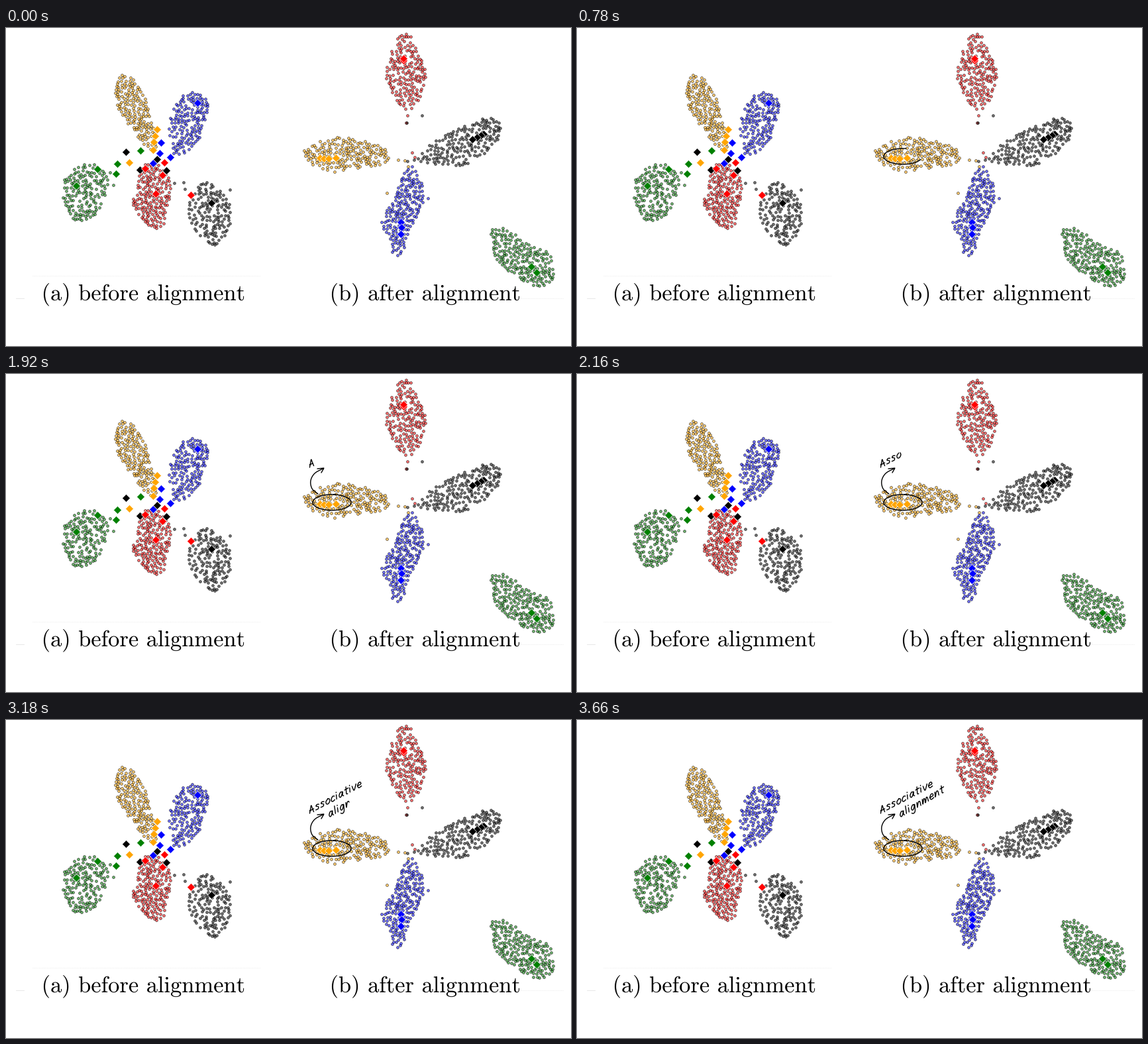
A matplotlib script for the animation above (8 s loop, 853x480 px).

```python
import numpy as np
import matplotlib.pyplot as plt
from matplotlib.animation import FuncAnimation
from matplotlib.patches import PathPatch
from matplotlib.path import Path
from matplotlib.textpath import TextPath
from matplotlib.transforms import Affine2D

plt.rcParams["mathtext.fontset"] = "cm"
W, H, DPI = 853, 480, 64
PX = 72 / DPI  # points per pixel
LOOP, STEP = 8000, 40
rng = np.random.default_rng(11)

fig = plt.figure(figsize=(W / DPI, H / DPI), dpi=DPI, facecolor="white")
ax = fig.add_axes([0, 0, 1, 1])
ax.set(xlim=(0, W), ylim=(H, 0))
ax.axis("off")


def smooth(pts, closed=False, n=10):
    """Catmull-Rom curve through the points."""
    p = np.asarray(pts, float)
    if closed:
        p = np.vstack([p[-1], p, p[0], p[1]])
    else:
        p = np.vstack([2 * p[0] - p[1], p, 2 * p[-1] - p[-2]])
    u = np.linspace(0, 1, n, endpoint=False)[:, None]
    out = []
    for a, b, c, d in zip(p, p[1:], p[2:], p[3:]):
        out.append(b + u * (c - a) / 2 + u**2 * (a - 2.5 * b + 2 * c - d / 2)
                   + u**3 * (1.5 * (b - c) + (d - a) / 2))
    return np.vstack(out + [p[-2:-1]])


def cluster(color, count, outline, strays=(), gap=3.1):
    """Scatter dots evenly at random inside a smooth outline."""
    edge = smooth(outline, closed=True)
    # keep dot centres slightly inside the outline
    mid = edge.mean(axis=0)
    edge = mid + (edge - mid) * 0.98
    cand = rng.uniform(edge.min(axis=0), edge.max(axis=0), (4000, 2))
    cand = cand[Path(edge).contains_points(cand)]
    dots = list(strays)
    for c in cand:
        if len(dots) >= count:
            break
        if not dots or np.hypot(*(np.array(dots) - c).T).min() > gap:
            dots.append(tuple(c))
    x, y = np.array(dots).T
    ax.plot(x, y, "o", ms=3.9 * PX, mfc=color, mec="black", mew=0.85 * PX,
            alpha=0.56, zorder=1)


def diamonds(color, pts):
    x, y = np.array(pts).T
    ax.plot(x, y, "D", ms=8.2 * PX, mfc=color, mec="white", mew=0.6 * PX, zorder=2)


def caption(words, x, y, size=34.5):
    text = r"\hspace{0.38}".join(r"\mathrm{%s}" % w for w in words.split())
    glyphs = TextPath((0, 0), f"${text}$", size=size)
    place = Affine2D().scale(1, -1).translate(x, y)
    ax.add_patch(PathPatch(place.transform_path(glyphs), fc="black", lw=0, zorder=3))


def rule(x0, x1, y, style="-"):
    ax.plot([x0, x1], [y, y], style, color="#e6e6e6", lw=0.9 * PX, zorder=0)


# before alignment
cluster("orange", 165, [(170, 72), (184, 70), (196, 82), (209, 100), (218, 138),
                        (228, 168), (224, 187), (208, 177), (190, 153),
                        (172, 128), (163, 106)])
cluster("blue", 160, [(285, 96), (296, 99), (306, 120), (299, 147), (290, 170),
                      (271, 189), (252, 190), (245, 152), (250, 120), (265, 102)])
cluster("red", 180, [(210, 205), (229, 205), (246, 222), (248, 250), (240, 285),
                     (236, 303), (218, 303), (203, 285), (190, 267), (197, 232)])
cluster("green", 160, [(120, 204), (145, 210), (154, 227), (151, 250), (143, 270),
                       (125, 290), (98, 288), (85, 262), (83, 243), (94, 218)],
        [(162, 237), (157, 218)])
cluster("black", 150, [(298, 229), (320, 241), (336, 261), (340, 290), (335, 308),
                       (318, 329), (303, 325), (285, 305), (272, 283), (280, 252)],
        [(254, 234), (268, 233), (270, 243), (338, 244)])

# after alignment
cluster("red", 180, [(594, 10), (609, 10), (625, 38), (634, 62), (631, 90),
                     (618, 118), (605, 124), (589, 110), (573, 75), (577, 45)],
        [(606, 132), (604, 143), (613, 188), (617, 195)])
cluster("orange", 190, [(447, 187), (470, 172), (500, 164), (530, 168), (567, 178),
                        (582, 197), (573, 207), (540, 210), (490, 218), (463, 208)],
        [(592, 199), (602, 200), (607, 209), (575, 249)])
cluster("black", 185, [(624, 190), (650, 168), (690, 148), (725, 134), (745, 142),
                       (747, 162), (735, 180), (715, 195), (692, 208), (660, 206),
                       (622, 202)],
        [(616, 199), (606, 201), (628, 132), (605, 143)])
cluster("blue", 195, [(606, 209), (624, 220), (629, 245), (630, 268), (618, 290),
                      (605, 315), (597, 343), (583, 342), (578, 318), (566, 293),
                      (582, 262), (592, 235)],
        [(637, 257), (613, 209)])
cluster("green", 200, [(726, 299), (755, 303), (778, 318), (800, 332), (822, 342),
                       (827, 380), (815, 389), (790, 388), (763, 371), (736, 350),
                       (733, 324)])

diamonds("blue", [(289, 113), (234, 173), (232, 189), (248, 195), (222, 204),
                  (596, 293), (597, 301), (596, 311)])
diamonds("orange", [(228, 153), (225, 163), (223, 172), (222, 184), (186, 203),
                    (474, 196), (480, 197), (487, 197), (498, 196)])
diamonds("green", [(203, 185), (168, 205), (138, 213), (166, 220), (106, 238),
                   (793, 360), (801, 369)])
diamonds("black", [(181, 187), (228, 198), (202, 214), (242, 215), (310, 264),
                   (721, 160), (717, 162), (711, 165), (704, 168)])
diamonds("red", [(239, 203), (210, 212), (236, 222), (226, 250), (279, 252),
                 (600, 49), (600, 46)])

rule(40, 384, 374, ":")
rule(15, 27, 408)
rule(778, 841, 408, ":")
caption("(a) before alignment", 53.6, 411)
caption("(b) after alignment", 488.6, 411)

# handwriting: advance, then strokes in units of the x-height
BOWL = [(.7, .85), (.35, 1), (.05, .5), (.2, .02), (.5, .25), (.7, .95)]
GLYPHS = {
    "A": (1.15, [(0, 0), (.2, .7), (.4, 1.4), (.55, .7), (.75, -.1)], [(.05, .5), (.8, .5)]),
    "s": (.95, [(.65, .85), (.3, 1), (.1, .75), (.5, .45), (.45, .05), (0, .05)]),
    "o": (1, [(.4, 1), (.05, .65), (.1, .15), (.45, 0), (.75, .4), (.65, .9), (.4, 1)]),
    "c": (.9, [(.65, .85), (.35, 1), (.05, .6), (.1, .1), (.4, 0), (.65, .15)]),
    "i": (.55, [(.1, .95), (.1, .05)], [(.1, 1.35), (.12, 1.45)]),
    "a": (1.1, BOWL + [(.68, .2), (.85, 0)]),
    "t": (.85, [(.3, 1.5), (.28, .15), (.5, 0)], [(0, 1), (.7, 1.05)]),
    "v": (.95, [(0, 1), (.3, 0), (.75, 1.05)]),
    "e": (1, [(.1, .5), (.65, .55), (.6, .95), (.3, 1), (.05, .5), (.25, 0), (.75, .1)]),
    "l": (.5, [(.1, 1.6), (.1, .05)]),
    "g": (1.1, BOWL + [(.65, -.4), (.3, -.7), (0, -.45)]),
    "n": (1.05, [(.05, 1), (.05, 0), (.3, .85), (.6, .9), (.7, 0)]),
    "m": (1.4, [(.05, 1), (.05, 0), (.3, .9), (.5, .8), (.55, 0), (.8, .9), (1, .8), (1.1, 0)]),
}


def write(word, x, y, angle, sx=9.1, sy=6.9, slant=2.8):
    a = np.radians(angle)
    pen, strokes = 0, []
    for ch in word:
        advance, *parts = GLYPHS[ch]
        for part in parts:
            p = smooth(part)
            u, v = (p[:, 0] + pen) * sx + p[:, 1] * slant, p[:, 1] * sy
            strokes.append(np.c_[x + u * np.cos(a) - v * np.sin(a),
                                 y - u * np.sin(a) - v * np.cos(a)])
        pen += advance
    return strokes


def timed(strokes, start, end):
    """Points with the moment at which the pen reaches each of them."""
    rows, dist = [], 0
    for s in strokes:
        d = np.r_[0, np.cumsum(np.hypot(*np.diff(s, axis=0).T))]
        even = np.linspace(0, d[-1], max(int(d[-1] / 0.7), 2))
        rows += [np.c_[dist + even, np.interp(even, d, s[:, 0]), np.interp(even, d, s[:, 1])],
                 [[dist + d[-1], np.nan, np.nan]]]
        dist += d[-1]
    rows = np.vstack(rows)
    rows[:, 0] = start + (end - start) * rows[:, 0] / dist
    return rows


turn = np.radians(np.linspace(80, 445, 90))
loop = np.c_[492 + 29 * np.cos(turn), 193.8 - 12 * np.sin(turn)]
shaft = smooth([(471, 181), (462, 173), (460, 161), (466, 150), (479, 142.5)])
head = np.array([(470, 143), (480, 142), (476, 149)], float)

ink = np.vstack([
    timed([loop], 40, 1020),
    timed([shaft, head], 1270, 1740),
    timed(write("Associative", 458.5, 141, 27.5), 1800, 2690),
    timed(write("alignment", 488, 147, 30), 2700, 3640),
])
pen_line, = ax.plot([], [], color="black", lw=1.4 * PX, solid_capstyle="round",
                    solid_joinstyle="round", zorder=4)


def update(i):
    n = np.searchsorted(ink[:, 0], i * STEP, side="right")
    pen_line.set_data(ink[:n, 1], ink[:n, 2])
    return pen_line,


anim = FuncAnimation(fig, update, frames=LOOP // STEP, interval=STEP,
                     repeat=True, repeat_delay=0, blit=False)
plt.show()
```
